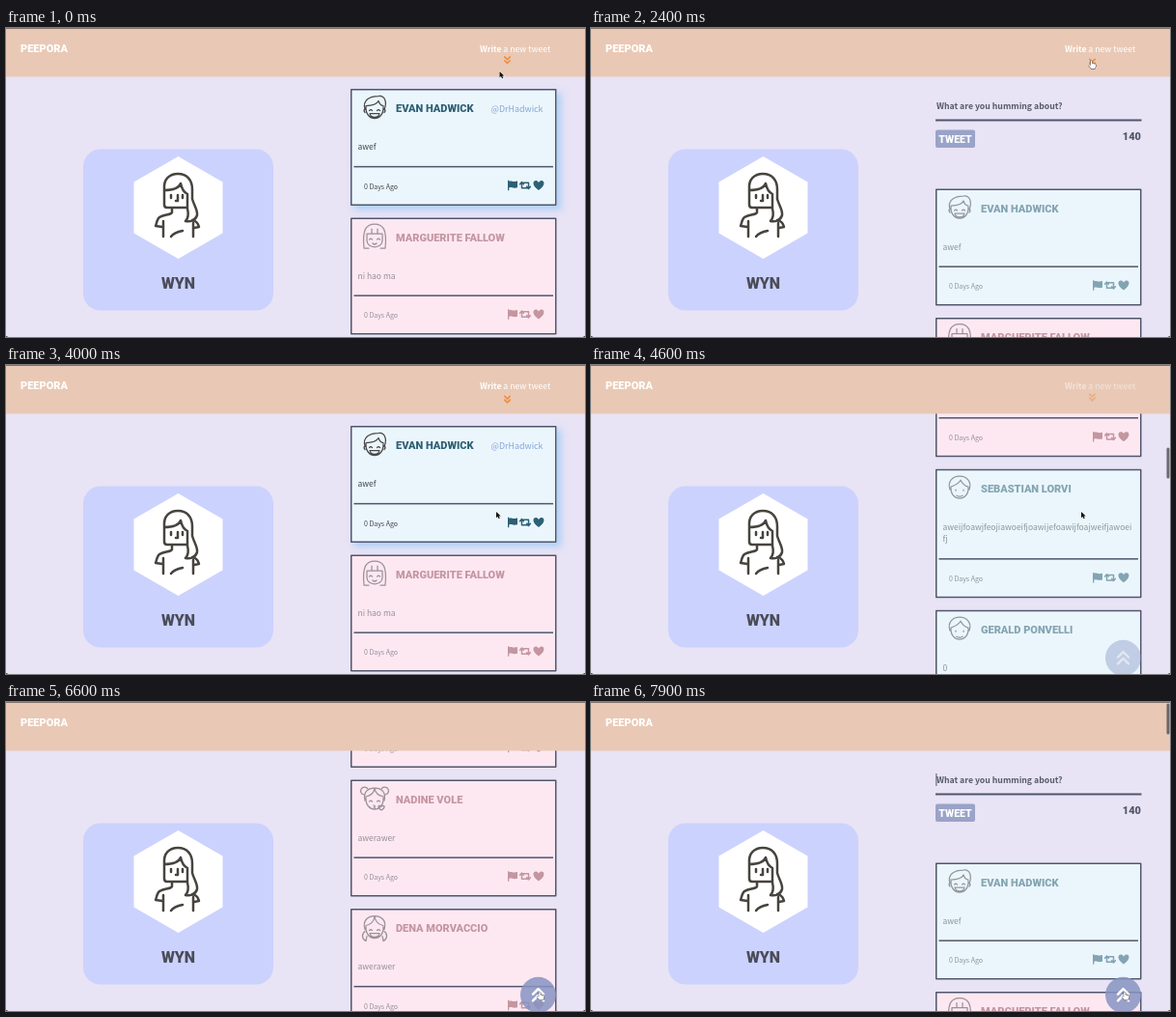
An HTML page with a canvas that plays this animation: 600x320 px, repeating every 8 s.

```html
<!DOCTYPE html>
<html lang="en">
<head>
<meta charset="utf-8">
<title>Feed</title>
<style>
html, body { margin: 0; width: 100%; height: 100%; overflow: hidden; background: #e8e3f5; }
canvas { display: block; width: 600px; height: 320px; }
</style>
</head>
<body>
<canvas id="stage"></canvas>
<script>
const W = 600, H = 320, LOOP = 8000;
const canvas = document.getElementById('stage');
const ctx = canvas.getContext('2d');
const dpr = window.devicePixelRatio || 1;
canvas.width = W * dpr;
canvas.height = H * dpr;

const BODY = '"Noto Sans CJK JP", "Noto Sans CJK SC", "Open Sans", sans-serif';
const HEAVY = 'Roboto, Inter, sans-serif';
const INK = '#50566c';
const SCROLL_END = 1330, COMPOSER = 103.5;

const TONES = {
  blue: { bg: '#ebf6fc', name: '#2d6074', handle: '#86a5d8' },
  pink: { bg: '#fde8f2', name: '#93525c', handle: '#d6bbdd' }
};

const LONG = ['aweijfoawjfeojiawoeifjoawijefoawijfoajweifjawoei', 'fj'];
const cards = [
  ['EVAN HADWICK', '@DrHadwick', 'blue', 'grin', ['awef']],
  ['MARGUERITE FALLOW', '@DrFallow', 'pink', 'bob', ['ni hao ma']],
  ['DORA MELVANE', '@DrMelvane', 'pink', 'tails', ['awer']],
  ['OSCAR TINDLEY', '@DrTindley', 'blue', 'boy', ['awef']],
  ['LENA CORBISH', '@DrCorbish', 'pink', 'bob', ['awefawef']],
  ['IRIS HALVANE', '@DrHalvane', 'pink', 'buns', ['awer']],
  ['SEBASTIAN LORVI', '@DrLorvi', 'blue', 'boy', LONG],
  ['GERALD PONVELLI', '@DrPonvelli', 'blue', 'boy', ['0']],
  ['HUGO STRADWELL', '@DrStradwell', 'blue', 'grin', ['awer']],
  ['MIRA OLDENBY', '@DrOldenby', 'pink', 'bob', ['awerawer']],
  ['NADINE VOLE', '@DrVole47', 'pink', 'buns', ['awerawer']],
  ['DENA MORVACCIO', '@DrMorvaccio', 'pink', 'tails', ['awerawer']]
].map(([name, handle, tone, face, lines]) => ({ name, handle, tone, face, lines }));

let nextTop = 63;
for (const card of cards) {
  card.extra = (card.lines.length - 1) * 12.5;
  card.top = nextTop;
  card.height = 121 + card.extra;
  nextTop += 133.5 + card.extra;
}

// Line art, centred on the origin
const JAW = 'M-9 -2C-10 14 10 14 9 -2';
const EYES = 'M-5.5 2q1.5-2 3 0M2.5 2q1.5-2 3 0';
const LAUGH = 'M-5 5H5C4 10-4 10-5 5Z';
const FACES = {
  grin: JAW + EYES + LAUGH + 'M-10 1C-13-9-5-13 4-13C11-14 13-6 10 1M-9-3C-4-3 2-4 4-8C5-5 7-3 9-3M-10 0q-2 2 0 4M10 0q2 2 0 4',
  boy: JAW + 'M-10 1C-13-8-7-13 0-13S13-8 10 1M-9-2C-4-4 0-6 1-9C3-5 6-3 9-2M-4 1v1M4 1v1M-3 7q3 2 6 0',
  bob: EYES + 'M-8-4V3C-8 12 8 12 8 3V-4M-11 11C-13-8-9-14 0-14S13-8 11 11H6M-11 11H-6M-8-4H8M-3-4v-5M3-4v-5M-2 6q2 2 4 0',
  buns: JAW + EYES + 'M-10 1C-12-8-7-12 0-12S12-8 10 1M-9-3C-4-4-1-7 0-11C1-7 4-4 9-3M-7-11A4 4 0 1 0-11-5M7-11A4 4 0 1 1 11-5M-1 6q3 1 0 2q3 1 0 2M7 11C2 8 4 5 7 7C10 5 12 8 7 11Z',
  tails: JAW + EYES + LAUGH + 'M-10 1C-13-9-6-13 0-13S13-9 10 1M-9-3C-4-4-1-7 0-12C1-7 4-4 9-3M-10 3C-14 6-13 11-9 13M10 3C14 6 13 11 9 13M-9 13L-8 8M9 13L8 8'
};
for (const key in FACES) FACES[key] = new Path2D(FACES[key]);

const PORTRAIT = new Path2D(
  'M164 183V167C163 156 170 151 178 151C188 151 193 158 193 167V177C195 184 199 189 198 194C196 200 190 201 186 200C190 196 189 191 188 187V172' +
  'M164 168C172 168 179 166 181 161C182 166 184 170 188 172' +
  'M164 183Q164 186 167 186H187M171 173v3M183 173v3M178 173v6h-2' +
  'M172 187V191C171 194 161 193 158 197C156 200 156 203 155 205L162 206M163 200V216' +
  'M193 199C198 200 199 203 200 206L195 207M194 202V216M171 216C174 212 178 211 183 210');

const FLAG = new Path2D('M-5-5.2h1.3v1C-1.5-5.5 0-3 5-4.4V2.3C0 3.5-1.5 1.2-3.7 2.4V5.2H-5Z');
const HEART = new Path2D('M0 5C-9-1-5-6.5-1.5-4.6Q-.4-4 0-3Q.4-4 1.5-4.6C5-6.5 9-1 0 5Z');
const REPEAT = new Path2D('M-3.5-3.2V2.8H2M-5.4-1.2L-3.5-3.4L-1.6-1.2M3.5 3.2V-2.8H-2M5.4 1.2L3.5 3.4L1.6 1.2');
const ARROW = new Path2D('M0 0V6.6L1.6 5.2L2.7 7.6L3.9 7L2.9 4.8H5Z');
const HAND = new Path2D('M-.8 0Q0-.8.8 0V3L4.4 3.6Q5 4 4.8 5.5L4 8.5H-.4L-2.8 5.2Q-2.6 4-.8 5Z');

const clamp = x => x < 0 ? 0 : x > 1 ? 1 : x;
const ramp = (t, a, b) => clamp((t - a) / (b - a));
const swing = (t, a, b) => 0.5 - 0.5 * Math.cos(Math.PI * ramp(t, a, b));

const path = [
  [0, 511.5, 45], [500, 518.5, 34], [3200, 518.5, 34], [3700, 508, 152],
  [4650, 508, 152], [5250, 506.5, 179.5], [5850, 506.5, 179.5], [6400, 553, 300.5]
];

function cursorAt(t) {
  let [, x, y] = path[0];
  for (let i = 1; i < path.length; i++) {
    const e = swing(t, path[i - 1][0], path[i][0]);
    x += (path[i][1] - path[i - 1][1]) * e;
    y += (path[i][2] - path[i - 1][2]) * e;
  }
  return { x, y };
}

function scrollAt(t) {
  if (t > 6800) return SCROLL_END * (1 - swing(t, 6800, 7400));
  return SCROLL_END * (1 - Math.pow(1 - ramp(t, 4250, 5250), 1.945));
}

function composerAt(t) {
  return swing(t, 1500, 1900) - swing(t, 2800, 3200) + swing(t, 7400, 7800);
}

function text(str, x, y, font, color, align = 'left') {
  ctx.font = font;
  ctx.fillStyle = color;
  ctx.textAlign = align;
  ctx.fillText(str, x, y);
}

function rect(x, y, w, h, color) {
  ctx.fillStyle = color;
  ctx.fillRect(x, y, w, h);
}

function roundRect(x, y, w, h, r, color) {
  ctx.fillStyle = color;
  ctx.beginPath();
  ctx.roundRect(x, y, w, h, r);
  ctx.fill();
}

function strokeShape(shape, width, color) {
  ctx.lineWidth = width;
  ctx.strokeStyle = color;
  ctx.stroke(shape);
}

function at(x, y, draw, scale = 1) {
  ctx.save();
  ctx.translate(x, y);
  ctx.scale(scale, scale);
  draw();
  ctx.restore();
}

function chevrons(x, y, half, rise, gap, width, color) {
  const p = new Path2D();
  for (const dy of [-gap / 2, gap / 2]) {
    p.moveTo(x - half, y + dy - rise / 2);
    p.lineTo(x, y + dy + rise / 2);
    p.lineTo(x + half, y + dy - rise / 2);
  }
  strokeShape(p, width, color);
}

function drawProfile() {
  roundRect(80, 125.5, 197, 167, 18, '#ccd2fe');
  ctx.fillStyle = '#fff';
  ctx.beginPath();
  for (const [x, y] of [[0, -53], [46, -26.5], [46, 26.5], [0, 53], [-46, 26.5], [-46, -26.5]])
    ctx.lineTo(178.5 + x, 186 + y);
  ctx.fill();
  strokeShape(PORTRAIT, 2.5, '#47443f');
  text('WYN', 178.5, 269.8, '900 16px ' + HEAVY, '#4a4c57', 'center');
}

function drawCard(card, y, hover) {
  const tone = TONES[card.tone];
  ctx.save();
  if (hover && card.tone === 'blue') {
    ctx.shadowColor = 'rgba(150,200,250,.75)';
    ctx.shadowBlur = 7 * dpr;
    ctx.shadowOffsetX = ctx.shadowOffsetY = 4 * dpr;
  }
  rect(357, y, 213.5, card.height, tone.bg);
  ctx.restore();
  ctx.strokeStyle = INK;
  ctx.lineWidth = 1.5;
  ctx.strokeRect(357.75, y + 0.75, 212, card.height - 1.5);
  rect(360.5, y + 79.9 + card.extra, 206.5, 1.5, INK);

  ctx.globalAlpha = hover ? 1 : 0.55;
  at(382, y + 20.5, () => strokeShape(FACES[card.face], 1.25, '#484848'));
  text(card.name, 404, y + 24.2, '900 11px ' + HEAVY, tone.name);
  card.lines.forEach((line, i) =>
    text(line, 364.5, y + 63.3 + i * 12.5, '300 8.5px ' + BODY, '#40434a'));
  const foot = y + card.extra + 100;
  text('0 Days Ago', 371, foot + 3.8, '300 7px ' + BODY, '#40434a');
  ctx.fillStyle = tone.name;
  at(525, foot, () => ctx.fill(FLAG));
  at(538, foot, () => strokeShape(REPEAT, 1.5, tone.name));
  at(552, foot, () => ctx.fill(HEART));
  ctx.globalAlpha = 1;
  if (hover) text(card.handle, 556.5, y + 24.4, '300 8.9px ' + BODY, tone.handle, 'right');
}

function drawComposer(open, scroll, caret) {
  if (open <= 0) return;
  ctx.save();
  ctx.beginPath();
  ctx.rect(350, 50 - scroll, 230, 11 + COMPOSER * open);
  ctx.clip();
  ctx.translate(0, -scroll);
  text('What are you humming about?', 358, 84, '600 8.7px ' + BODY, '#555a6a');
  if (caret) rect(357.5, 74, 0.8, 13, '#333');
  rect(357, 94.5, 213.5, 2, INK);
  roundRect(357, 105.5, 41, 18.5, 2, '#9aa3c8');
  text('TWEET', 377.5, 118.6, '900 10.5px ' + HEAVY, '#fff', 'center');
  text('140', 570, 115.6, '900 11px ' + HEAVY, '#50566a', 'right');
  ctx.restore();
}

function drawHeader(t, linkAlpha) {
  rect(0, 0, W, 50.5, '#e9c9b5');
  rect(0, 0, W, 0.8, '#6a5f5a');
  text('PEEPORA', 15, 25.4, '900 11px ' + HEAVY, '#fff');
  if (linkAlpha <= 0) return;
  ctx.globalAlpha = linkAlpha;
  text('Write', 491, 25.3, '700 8.5px ' + BODY, '#fff');
  const w = ctx.measureText('Write').width;
  text(' a new tweet', 491 + w, 25.3, '300 8.7px ' + BODY, '#fff');
  const y = 34.4 - 1.2 * Math.cos(2 * Math.PI * t / 1600);
  chevrons(519.5, y, 2.8, 2.8, 3.8, 1.5, '#f08a3e');
  ctx.globalAlpha = 1;
}

function drawTopButton(alpha) {
  if (alpha <= 0) return;
  ctx.globalAlpha = alpha;
  ctx.fillStyle = 'rgba(136,149,194,.85)';
  ctx.beginPath();
  ctx.arc(551.5, 303.3, 18.5, 0, 2 * Math.PI);
  ctx.fill();
  at(551.5, 303.3, () => {
    ctx.scale(1, -1);
    chevrons(0, 0, 5.5, 5.5, 6.8, 2.5, '#fff');
  });
  ctx.globalAlpha = 1;
}

function drawCursor(t, { x, y }) {
  const hand = (t > 350 && t < 3300) || t > 6350;
  at(x, y, () => {
    ctx.fillStyle = hand ? '#fff' : '#111';
    const shape = hand ? HAND : ARROW;
    strokeShape(shape, 1, hand ? '#333' : 'rgba(255,255,255,.8)');
    ctx.fill(shape);
  }, 0.95);
}

function draw(t) {
  const scroll = scrollAt(t), open = composerAt(t), cursor = cursorAt(t);
  const faded = ramp(t, 4400, 4800);
  const scrolling = (t > 4250 && t < 5250) || t > 6800;
  const onButton = faded > 0 && Math.hypot(cursor.x - 551.5, cursor.y - 303.3) < 18.5;

  ctx.setTransform(dpr, 0, 0, dpr, 0, 0);
  ctx.lineCap = ctx.lineJoin = 'round';
  rect(0, 0, W, H, '#e8e3f5');
  drawProfile();
  drawComposer(open, scroll, t > 7500 && t % 1000 > 400);

  cards.forEach((card, i) => {
    const y = card.top + COMPOSER * open - scroll;
    if (y > H || y + card.height < 45) return;
    const inside = cursor.y > y && cursor.y < y + card.height && !scrolling && !onButton;
    const leaving = t < 100 && i === 0;
    drawCard(card, y, inside || leaving);
  });

  drawHeader(t, 1 - faded);
  drawTopButton(faded);

  const bar = t < 6500 ? ramp(t, 4200, 4300) * (1 - ramp(t, 5900, 6150)) : ramp(t, 6800, 6850);
  if (bar > 0) roundRect(596.5, 1.5 + scroll * 0.111, 3, 32, 1.5, `rgba(85,85,92,${0.85 * bar})`);

  rect(0, 319, 1.5, 1, '#4a4a50');
  rect(598.5, 319, 1.5, 1, '#4a4a50');
  drawCursor(t, cursor);
}

const start = performance.now();
function frame() {
  draw((performance.now() - start) % LOOP);
  requestAnimationFrame(frame);
}
frame();
</script>
</body>
</html>
```
